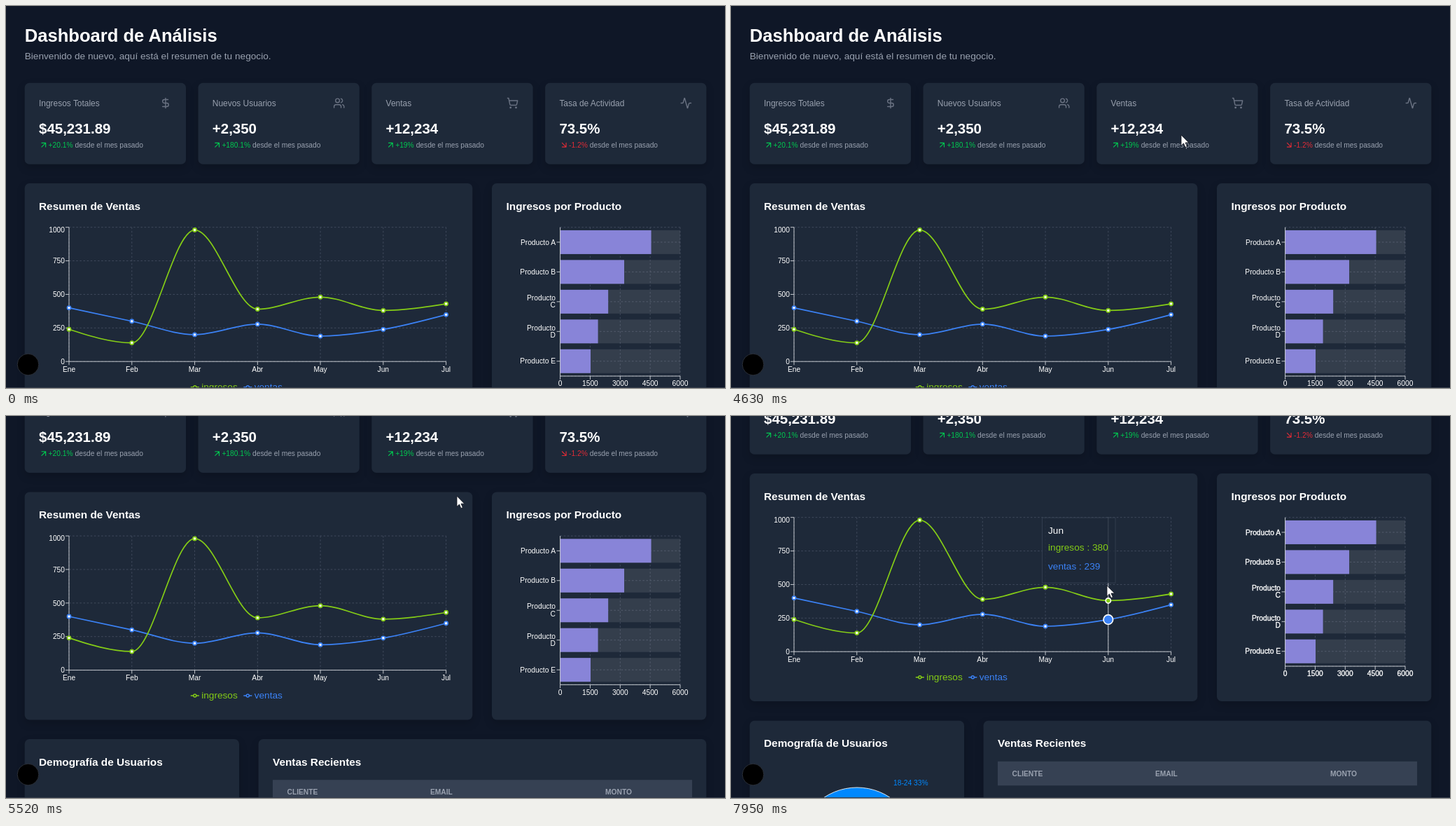
Write an HTML page that moves like this. It is 1027 px wide and 545 px high and loops after 8 s.

```html
<!DOCTYPE html>
<html lang="es">
<head>
<meta charset="utf-8">
<title>Dashboard de Análisis</title>
<style>
  html, body { margin: 0; width: 100%; height: 100%; overflow: hidden; background: #0f1727; }
  svg { display: block; width: 100%; height: 100%; }
  text { font-family: "Liberation Sans", Arial, sans-serif; white-space: pre; }
  .card { fill: #1e2939; filter: drop-shadow(0 5px 6px rgba(0, 0, 0, .16)); }
  .grid { stroke: #465062; stroke-width: .85; stroke-dasharray: 2.56; fill: none; }
  .axis { stroke: #d4d7dc; stroke-width: .9; fill: none; }
  .icon { fill: none; stroke: #6a7282; stroke-width: 2; stroke-linecap: round; stroke-linejoin: round; }
  .sel { fill: #073fa9; visibility: hidden; }
  .on .sel { visibility: visible; }
  .on text { fill: #fff; }
</style>
</head>
<body>
<svg viewBox="0 0 1027 545" preserveAspectRatio="none">
  <g id="page"></g>
  <circle cx="31.5" cy="511.5" r="15.3" fill="#000" stroke="#2b3039"/>
  <rect y="544" width="1027" height="1" fill="#363d4a"/>
  <g id="cursor">
    <circle id="press" r="10" fill="#c4ba00" fill-opacity=".68"/>
    <path id="beam" d="M-3-7.5h2.2l.8.8.8-.8h2.2M0-6.7v13.4M-3 7.5h2.2l.8-.8.8.8h2.2" fill="none" stroke="#d5d8dd" stroke-width="1.1"/>
    <path id="arrow" d="M0 0v15.2l3.5-3.3 2.4 5.6 2.5-1.1-2.4-5.4h4.8z" fill="#fff" stroke="#10141d" stroke-width=".8"/>
  </g>
</svg>
<script>
const $ = id => document.getElementById(id);
const LOOP = 8000;
const SMALL = 10.24, BASE = 13.65;
const GREEN = '#84cc16', BLUE = '#3b82f6', MUTED = '#99a1af';

// ---------- markup helpers ----------
const text = (x, y, str, size, fill = '#fff', extra = '') =>
  `<text x="${x}" y="${y}" font-size="${size}" fill="${fill}" ${extra}>${str}</text>`;
const bold = 'font-weight="700"', end = 'text-anchor="end"', middle = 'text-anchor="middle"';
const rect = (x, y, w, h, attrs) => `<rect x="${x}" y="${y}" width="${w}" height="${h}" ${attrs}/>`;
const card = (x, y, w, h) => rect(x, y, w, h, 'rx="6.8" class="card"');
const path = (d, attrs) => `<path d="${d}" ${attrs}/>`;
const icon = (x, y, size, d, attrs = '') =>
  `<g transform="translate(${x} ${y}) scale(${size / 24})">${path(d, 'class="icon" ' + attrs)}</g>`;
const heading = (x, y, str) => text(x, y, str, 15.36, '#fff', bold);

// ---------- summary cards ----------
const ICONS = {
  dollar: 'M12 2v20M17 5H9.5a3.5 3.5 0 0 0 0 7h5a3.5 3.5 0 0 1 0 7H6',
  users: 'M16 21v-2a4 4 0 0 0-4-4H6a4 4 0 0 0-4 4v2M13 7a4 4 0 1 1-8 0 4 4 0 1 1 8 0M22 21v-2a4 4 0 0 0-3-3.87M16 3.13a4 4 0 0 1 0 7.75',
  cart: 'M9 21a1 1 0 1 1-2 0 1 1 0 1 1 2 0M20 21a1 1 0 1 1-2 0 1 1 0 1 1 2 0M2.05 2.05h2l2.66 12.42a2 2 0 0 0 2 1.58h9.78a2 2 0 0 0 1.95-1.57l1.65-7.43H5.12',
  pulse: 'M22 12h-2.48a2 2 0 0 0-1.93 1.46l-2.35 8.36a.25.25 0 0 1-.48 0L9.24 2.18a.25.25 0 0 0-.48 0l-2.35 8.36A2 2 0 0 1 4.49 12H2',
  up: 'M7 7h10v10M7 17 17 7',
  down: 'M7 7l10 10M17 7v10H7'
};
const stats = [
  ['Ingresos Totales', '$45,231.89', '+20.1%', 'dollar'],
  ['Nuevos Usuarios', '+2,350', '+180.1%', 'users'],
  ['Ventas', '+12,234', '+19%', 'cart'],
  ['Tasa de Actividad', '73.5%', '-1.2%', 'pulse']
];
const statLeft = i => 26.7 + i * 247.8;

function statCard([label, value, change, symbol], i) {
  const x = statLeft(i), tx = x + 20.3;
  const falling = change[0] === '-', color = falling ? '#e22b36' : '#00c950';
  const row = (name, top, height, content) =>
    `<g id="${name}${i}">${rect(0, top, 0, height, 'class="sel"')}${content}</g>`;
  return card(x, 109.7, 230.3, 116)
    + icon(x + 192.7, 130, 17.07, ICONS[symbol])
    + row('label', 130.3, 17.2, text(tx, 143, label, 11.95, MUTED))
    + row('value', 161.3, 26.4, text(tx, 181.5, value, 20.48, '#fff', bold))
    + icon(tx, 191.4, BASE, ICONS[falling ? 'down' : 'up'], `style="stroke:${color}"`)
    + row('sub', 191.3, 14, text(tx + 13.6, 202, `${change}<tspan fill="inherit"> </tspan>`, SMALL, color)
      + text(0, 202, 'desde el mes pasado', SMALL, MUTED));
}

// ---------- line chart ----------
const months = ['Ene', 'Feb', 'Mar', 'Abr', 'May', 'Jun', 'Jul'];
const income = [240, 139, 980, 390, 480, 380, 430];
const sales = [400, 300, 200, 278, 189, 239, 349];
const plot = { left: 90, right: 628.6, top: 315.7, bottom: 507.2 };
const stepX = (plot.right - plot.left) / 6;
const monthX = i => plot.left + i * stepX;
const valueY = v => plot.bottom - v * (plot.bottom - plot.top) / 1000;

// Monotone cubic through evenly spaced points.
function monotone(values) {
  const ys = values.map(valueY), n = ys.length;
  const s = ys.slice(1).map((y, i) => (y - ys[i]) / stepX);
  const m = ys.map((_, i) => i && i < n - 1
    ? (Math.sign(s[i - 1]) + Math.sign(s[i]))
      * Math.min(Math.abs(s[i - 1]), Math.abs(s[i]), Math.abs(s[i - 1] + s[i]) / 4)
    : 0);
  m[0] = (3 * s[0] - m[1]) / 2;
  m[n - 1] = (3 * s[n - 2] - m[n - 2]) / 2;
  const third = stepX / 3;
  return ys.reduce((d, y, i) => i
    ? d + `C${monthX(i - 1) + third} ${ys[i - 1] + m[i - 1] * third} ${monthX(i) - third} ${y - m[i] * third} ${monthX(i)} ${y}`
    : `M${plot.left} ${y}`, '');
}
const series = (values, color) => path(monotone(values), `fill="none" stroke="${color}" stroke-width="1.7"`)
  + values.map((v, i) => `<circle cx="${monthX(i)}" cy="${valueY(v)}" r="2.56" fill="#fff" stroke="${color}" stroke-width="1.7"/>`).join('');
const legend = (x, name, color) =>
  path(`M${x} 543.7h4m4 0h4M${x + 4} 543.7a2 2 0 1 0 4 0 2 2 0 1 0-4 0`, `fill="none" stroke="${color}" stroke-width="1.5"`)
  + text(x + 15.4, 547.6, name, BASE, color);

function lineChart() {
  const { left, right, top, bottom } = plot;
  const ticks = [0, 250, 500, 750, 1000];
  return ticks.map(v => path(`M${left} ${valueY(v)}H${right}`, 'class="grid"')).join('')
    + months.map((_, i) => path(`M${monthX(i)} ${top}V${bottom}`, 'class="grid"')).join('')
    + path(`M${left} ${top}V${bottom}H${right}`, 'class="axis"')
    + ticks.map(v => path(`M${left - 5} ${valueY(v)}h5`, 'class="axis"')
      + text(84, valueY(v) + (v === 1000 ? 7 : 3.7), v, SMALL, '#fff', end)).join('')
    + months.map((m, i) => path(`M${monthX(i)} ${bottom}v5`, 'class="axis"')
      + text(monthX(i), 521.8, m, SMALL, '#fff', middle)).join('')
    + series(sales, BLUE) + series(income, GREEN)
    + legend(263.8, 'ingresos', GREEN) + legend(339.3, 'ventas', BLUE);
}

// ---------- bar chart ----------
function barChart() {
  const x0 = 791.6, x1 = 963, top = 315.7, bottom = 528, band = (bottom - top) / 5;
  const scale = (x1 - x0) / 6000;
  const center = i => top + (i + .5) * band;
  const ticks = [0, 1500, 3000, 4500, 6000];
  const bars = [4550, 3200, 2400, 1890, 1520];
  const labels = bars.map((_, i) => {
    const letter = 'ABCDE'[i], y = center(i);
    return letter === 'C' || letter === 'D'
      ? text(785, y - 1.8, 'Producto', SMALL, '#fff', end) + text(785, y + 8.6, letter, SMALL, '#fff', end)
      : text(785, y + 3.6, 'Producto ' + letter, SMALL, '#fff', end);
  });
  return [top, bottom, ...bars.map((_, i) => center(i))].map(y => path(`M${x0} ${y}H${x1}`, 'class="grid"')).join('')
    + ticks.map(v => path(`M${x0 + v * scale} ${top}V${bottom}`, 'class="grid"')).join('')
    + bars.map((v, i) => rect(x0, center(i) - band * .4, x1 - x0, band * .8, 'fill="#eee" fill-opacity=".1"')
      + rect(x0, center(i) - band * .4, v * scale, band * .8, 'fill="#8884d8"')
      + path(`M${x0 - 5} ${center(i)}h5`, 'class="axis"')).join('')
    + path(`M${x0} ${top}V${bottom}H${x1}`, 'class="axis"')
    + ticks.map(v => path(`M${x0 + v * scale} ${bottom}v5`, 'class="axis"')).join('')
    + `<g id="barText" stroke="#fff" stroke-width="0">${labels.join('')}`
    + ticks.map(v => text(x0 + v * scale, 542.4, v, SMALL, '#fff', middle)).join('') + '</g>';
}

// ---------- hover layer ----------
const hoverLayer = `<g id="hover">
  <path id="hoverLine" d="M0 ${plot.top}V${plot.bottom}" class="axis"/>
  <circle id="incomeDot" r="3.6" fill="${GREEN}" stroke="#fff" stroke-width="1.7"/>
  <circle id="salesDot" r="6.8" fill="${BLUE}" stroke="#fff" stroke-width="1.7"/>
  <g id="tip">${rect(.4, .4, 104.6, 93, 'fill="#1e2939" fill-opacity=".82" stroke="#364153" stroke-width=".85"')}
    ${text(9, 23.3, '', BASE, '#fff', 'id="tipMonth"')}
    ${text(9, 47.3, '', BASE, GREEN, 'id="tipIncome"')}
    ${text(9, 74.6, '', BASE, BLUE, 'id="tipSales"')}</g></g>`;

$('page').innerHTML =
  text(26.7, 51, 'Dashboard de Análisis', 25.6, '#fff', bold)
  + text(26.7, 76, 'Bienvenido de nuevo, aquí está el resumen de tu negocio.', BASE, MUTED)
  + stats.map(statCard).join('')
  + card(26.7, 253, 639.6, 325) + heading(47, 291, 'Resumen de Ventas') + lineChart()
  + card(694, 253, 306.3, 325) + heading(714.5, 291, 'Ingresos por Producto') + barChart()
  + card(26.7, 605.7, 306.3, 325) + heading(47, 643.2, 'Demografía de Usuarios')
  + `<circle cx="180" cy="786" r="85" fill="#0088fe" stroke="#fff" stroke-width=".85"/>`
  + text(232, 698, '18-24 33%', SMALL, '#0088fe')
  + card(360.6, 605.7, 639.7, 325) + heading(381, 643.2, 'Ventas Recientes')
  + rect(381, 663.8, 599, 34.4, 'fill="#364153"')
  + [[401.5, 'CLIENTE'], [606, 'EMAIL'], [856, 'MONTO']].map(([x, s]) => text(x, 684.5, s, SMALL, MUTED, bold)).join('')
  + hoverLayer;

// Fit the selection boxes to the text they lie behind.
stats.forEach((_, i) => {
  for (const [name, pad] of [['label', 3], ['value', 6], ['sub', 3]]) {
    const [box, first, second] = $(name + i).children;
    const x = +first.getAttribute('x');
    let width = first.getComputedTextLength();
    if (second) {
      width = stats[i][2].length ? first.getSubStringLength(0, stats[i][2].length) + 3 : width;
      second.setAttribute('x', x + width);
      width += second.getComputedTextLength();
    }
    box.setAttribute('x', x);
    box.setAttribute('width', width + pad);
  }
});
const firstValue = $('value0').firstChild, anchorX = 58.4;
const firstValueEnd = +firstValue.getAttribute('x') + +firstValue.getAttribute('width');
firstValue.setAttribute('x', anchorX);

// ---------- motion ----------
const pointer = [
  [1250, 197, 39], [1670, 141, 195], [1870, 139, 195], [2140, 139, 195], [2400, 115, 202],
  [2910, 62, 178], [2980, 64, 176], [3390, 564, 176], [3600, 860, 181], [3740, 915, 184],
  [4000, 916, 184], [4300, 700, 186], [4560, 643, 185], [4630, 643, 184], [4850, 643, 184],
  [5300, 644, 116], [5660, 644, 113], [5950, 620, 200], [6065, 600, 234], [6110, 88, 257],
  [6140, 87, 258], [6480, 87, 258], [6700, 135, 256], [7000, 225, 250], [7220, 315, 245],
  [7480, 405, 243], [7850, 495, 242], [7950, 537, 242]
];
const scroll = [[4800, 0], [5050, 85.3], [5345, 85.3], [5380, 90.7], [5590, 171]];
// [time, month, tooltip y]
const hovers = [
  [5960, 6, 414], [6105, 0, 327.5], [6700, 1, 315.7], [7000, 2, 315.7],
  [7220, 3, 315.7], [7480, 4, 315.7], [7850, 5, 315.7]
];

function sample(keys, t) {
  const next = keys.findIndex(k => k[0] > t);
  if (next < 1) return (next ? keys[keys.length - 1] : keys[0]).slice(1);
  const a = keys[next - 1], b = keys[next], u = (t - a[0]) / (b[0] - a[0]);
  return a.slice(1).map((v, i) => v + (b[i + 1] - v) * u);
}

// CSS "ease": cubic-bezier(.25, .1, .25, 1)
function ease(x) {
  if (x >= 1) return 1;
  let lo = 0, hi = 1, u = .5;
  for (let i = 0; i < 20; i++) {
    u = (lo + hi) / 2;
    if (.75 * u * (1 - u) + u ** 3 < x) lo = u; else hi = u;
  }
  return .3 * u * (1 - u) ** 2 + 3 * u * u * (1 - u) + u ** 3;
}

// The tooltip glides to each new month for 400 ms, from wherever it is.
function tooltipAt(t) {
  let pos = null;
  hovers.forEach(([start, month, y], i) => {
    if (t < start) return;
    const x = monthX(month);
    const target = [month > 4 ? x - 113.5 : x + 8.5, y];
    const until = Math.min(t, hovers[i + 1] ? hovers[i + 1][0] : LOOP);
    const u = ease((until - start) / 400);
    pos = pos ? pos.map((p, k) => p + (target[k] - p) * u) : target;
  });
  return pos;
}

const show = (id, visible) => $(id).style.display = visible ? '' : 'none';
const move = (id, x, y) => $(id).setAttribute('transform', `translate(${x} ${y})`);

function drawSelection(t, x) {
  const active = t >= 2980 && t < 4300;
  const reach = t < 3740 ? x : 916;
  stats.forEach((_, i) => {
    const left = statLeft(i) + 20;
    const mark = (name, on) => $(name + i).classList.toggle('on', active && on);
    mark('label', i > 0 && reach > left);
    mark('value', i ? reach > left + 45 : true);
    mark('sub', reach > statLeft(i + 1));
  });
  firstValue.setAttribute('width', Math.max(0, Math.min(reach, firstValueEnd) - anchorX));
}

function drawHover(t) {
  const current = hovers.filter(h => t >= h[0]).pop();
  show('hover', current);
  if (!current) return;
  const month = current[1], x = monthX(month);
  move('hoverLine', x, 0);
  move('incomeDot', x, valueY(income[month]));
  move('salesDot', x, valueY(sales[month]));
  move('tip', ...tooltipAt(t));
  $('tipMonth').textContent = months[month];
  $('tipIncome').textContent = 'ingresos : ' + income[month];
  $('tipSales').textContent = 'ventas : ' + sales[month];
}

function draw(t) {
  const [x, y] = sample(pointer, t);
  const isArrow = t >= 4450;
  move('page', 0, -sample(scroll, t)[0]);
  move('cursor', x, y);
  show('cursor', t >= 1250);
  show('beam', !isArrow);
  show('arrow', isArrow);
  show('press', (t >= 2980 && t < 3950) || (t >= 4240 && t < 4350));
  $('barText').setAttribute('stroke-width', t >= 5660 ? .35 : 0);
  drawSelection(t, x);
  drawHover(t);
}

const begin = performance.now();
(function tick() {
  draw((performance.now() - begin) % LOOP);
  requestAnimationFrame(tick);
})();
</script>
</body>
</html>
```
